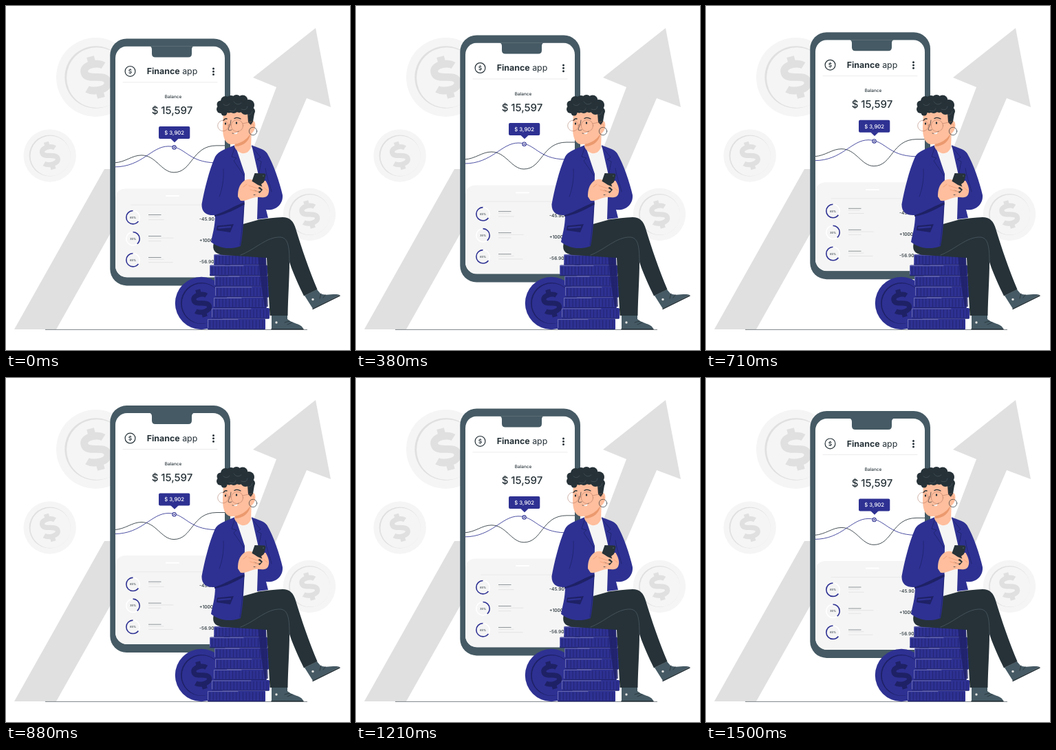
An HTML page for the animation above (1.54 s loop, 500 by 500 pixels).

```html
<!DOCTYPE html>
<html lang="en">
<head>
<meta charset="utf-8">
<title>Finance app</title>
<style>
  html, body { margin: 0; width: 100%; height: 100%; overflow: hidden; background: #fff; }
  svg { display: block; width: 100vw; height: 100vh; }
  text { font-family: Inter, sans-serif; font-weight: 500; fill: #263238; text-rendering: geometricPrecision; }
  .mid { text-anchor: middle; }
  .grey { --face: #f5f5f5; --mark: #e0e0e0; }
  .blue { --face: #2e3192; --mark: #1e2165; }
  .line { fill: none; stroke-linecap: round; stroke-linejoin: round; }
  .ink { stroke: #263238; }
  .shade { stroke: #1e2165; }
</style>
</head>
<body>
<svg viewBox="0 0 500 500">
  <defs>
    <path id="dollar" fill="none" d="M10 -9C5.500 -14 -9.500 -15 -9.500 -7C-9.500 2 10 -2 10 7C10 15 -6 14 -11 9M0 -20.500V-12M0 12V20.500"/>
    <g id="coin">
      <circle r="38.2" fill="var(--face)"/>
      <circle r="30" fill="var(--mark)"/>
      <circle cx="1" cy=".4" r="29.2" fill="var(--face)"/>
      <use href="#dollar" transform="rotate(-15)" stroke="var(--mark)" stroke-width="7.2"/>
    </g>
    <clipPath id="screen"><rect x="159" y="58" width="159" height="336" rx="17"/></clipPath>
  </defs>

  <g class="grey">
    <use href="#coin" transform="translate(130.5 103.5) scale(1.505)"/>
    <use href="#coin" transform="translate(63.7 217.5)"/>
    <use href="#coin" transform="translate(441 303)"/>
  </g>
  <path fill="#e0e0e0" d="M12 470L143 237H348L393 118L359 104L450 32L472 147L437 134L369 291H174L73 470Z"/>
  <path class="ink" stroke-width=".6" d="M57 470.4H438"/>

  <g id="phone">
    <rect x="151.3" y="47" width="174.7" height="359" rx="24" fill="#455a64"/>
    <g clip-path="url(#screen)">
      <path fill="#fff" d="M159 58H318V394H159Z"/>
      <path fill="#f5f5f5" d="M159 394V281Q159 265 175 265H302Q318 265 318 281V394Z"/>
      <path fill="#455a64" d="M207 57C211 58 212 60 212 63V69Q212 74 217 74H265Q270 74 270 69V63C270 60 271 58 275 57Z"/>
      <g class="line" stroke-width=".85">
        <path class="ink" d="M158 227.500C174 226.500 183 216.500 197 216.500C218 216.500 226 241.500 244 241.500C271 241.500 270 202.500 306 202.500H319"/>
        <path stroke="#2e3192" d="M158 233.500C198 233.500 211 203.500 236 203.500C261 203.500 264 227 305 227.500H319"/>
      </g>
      <circle cx="244.5" cy="205.2" r="2.7" fill="#fff" stroke="#2e3192" stroke-width="1.1"/>
      <circle cx="244.5" cy="205.2" r="1.1" fill="#2e3192"/>
      <path class="line" stroke="#e6e6e6" stroke-width=".8" d="M170 110.5H307M182 288.700H305"/>
      <path class="line" stroke="#fff" stroke-width="2" d="M233 275.700H251"/>
    </g>
    <circle cx="180.5" cy="94.5" r="7.4" class="line ink" stroke-width="1.2"/>
    <use href="#dollar" transform="translate(180.500 94.500) scale(.18)" class="ink" stroke-width="6"/>
    <path class="line ink" stroke-width="3" stroke-dasharray="0 4.300" d="M301.500 90.500V99.500"/>
    <text class="mid" x="241.5" y="98.800" font-size="12.400" style="font-weight:400"><tspan font-weight="700">Finance</tspan> app</text>
    <text class="mid" x="243" y="134" font-size="6.400">Balance</text>
    <text class="mid" x="241.5" y="157" font-size="15">$ 15,597</text>
    <rect x="222" y="174.500" width="45.300" height="18" rx="2" fill="#2e3192"/>
    <path fill="#2e3192" d="M239 192H251L245 197.800Z"/>
    <text class="mid" x="244.700" y="186.400" font-size="7.800" style="fill:#fff">$ 3,902</text>
    <g id="rows"></g>
  </g>

  <use href="#coin" class="blue" transform="translate(284 432)"/>
  <g id="stack"></g>
  <path fill="#1e2165" opacity=".75" d="M366 362H378L381 437H376Q370 405 366 362Z"/>

  <g id="shoes">
    <path fill="#455a64" d="M386 448H409V455C415 461 430 462 432 469H386Z"/>
    <path fill="#455a64" d="M434 421L452 412L457 418C465 422 478 417 485 420L446 440Z"/>
    <path class="line ink" stroke-width="1.5" d="M386 469.700H432M446 440.300L485 421"/>
    <path class="line ink" stroke-width=".8" d="M405 460L412 458M409 463L416 460M456 425L458 418M461 424L464 420"/>
    <circle cx="393" cy="460" r="1.700" fill="#e0e0e0"/><circle cx="446" cy="426.500" r="1.700" fill="#e0e0e0"/>
  </g>
  <path fill="#263238" d="M302 344C299 355 304 361 317 362L379 366C380 390 382 420 383.500 450H409.500C410 420 412 395 412 372C417 388 426 407 433 421.500L452.500 412C441 385 429 350 421.500 325C418 312 412 307 402 307C380 308 355 312 342 314Z"/>
  <path class="line" stroke="#65737a" stroke-width=".5" d="M341 362C362 354 379 335 399 336C409 337 412 347 412 372"/>

  <g id="torso">
    <path fill="#f5f5f5" d="M333 204L358 205L368 250L366 311L341 318Z"/>
    <path fill="#2e3192" d="M357 202C364 206 375 207 379.500 214C389 230 398 257 402 275C403 289 391 298 378 296L381 308L365 310L367 246Z"/>
    <path fill="#2e3192" d="M333 202C322 207 309 210 304 219C295 239 288 269 284.500 288C284 300 292 305 304 304C304 320 300 332 298 343C307 350 321 356 341 349C345 330 346 300 346.500 286L347 244Z"/>
    <path fill="#1e2165" d="M303 304C317 300 329 292 346.500 285V288.500C335 295 321 303 303 306Z"/>
    <path fill="#1e2165" d="M307 319.500L331 317L326 329L306 326Z"/>
    <path class="line" stroke="#2e3192" stroke-width="2.500" d="M309 322.500L326 321"/>
    <path class="line shade" stroke-width=".7" d="M333 204L328 219L335 221L331 225L346 247M357 204L370 220L365 223L371 226L367 247M316 237C317 252 314 267 310 277M377 236C379 250 384 260 386 270M346 288C344 308 343 330 340 348"/>
  </g>

  <g id="hands">
    <path fill="#ffbe9d" d="M337 277C337 267 339 260 345 255C351 250 358 251 363 256L377 254C381 259 384 268 381 274C377 281 369 277 363 278C355 279 349 284 341 283Z"/>
    <path fill="#263238" d="M361.500 243L375.500 243.500Q378 244 377.300 247L373 263L357 256Z"/>
    <path fill="#ffbe9d" d="M346 254C353 251 361 256 368 262L364 266L352 260ZM371 259L377.500 254L381 264L375 270Z"/>
    <path fill="#263238" d="M359 268L369 263L373 267L367 274L360 275Z"/>
    <path fill="#ffbe9d" d="M352 262C360 260 367 264 371 268L367 270C362 267 359 267 356 268ZM356 268C362 267 368 270 370 274L365 275L356 273Z"/>
    <path class="line" stroke="#eb996e" stroke-width=".7" d="M353 261L365 265M355 267L365 270M375 264L380 268M345 263L350 259"/>
    <circle cx="374" cy="247" r="1" fill="#455a64"/>
  </g>

  <g id="head">
    <path fill="#ffbe9d" d="M333 192L357 178L356 205C354 212 348 215 343 214C337 212 333 208 332 204Z"/>
    <path fill="#eb996e" d="M333 200C342 199 350 194 355 186C354 196 345 204 333 204Z"/>
    <path fill="#ffbe9d" d="M316 151L315 177C315 190 318 199 326 201C338 202 349 195 354 186C363 185 365 168 359 167L354 169L351 147Z"/>
    <g id="hair" fill="#263238"></g>
    <path fill="#263238" d="M351 156H361L359 168L356 173L352 169Z"/>
    <path class="line" stroke="#65737a" stroke-width=".4" d="M316 143Q321 147 325 142M331 139Q336 146 342 141M325 152Q332 155 334 149M342 150Q350 153 351 146M351 158Q356 160 358 153"/>
    <g class="line ink">
      <path d="M316 166.500Q318 163 321 164M332 163.500Q336 161 341 164" stroke-width="1.400"/>
      <path d="M327 166C327 172 323 177 323 180Q325 182 328 180M329 185Q334 187 338 182" stroke-width=".7"/>
      <circle cx="359" cy="182" r="5.700" stroke-width=".7"/>
    </g>
    <path fill="#fff" d="M330 185Q334 185 337 183Q336 188 330 185Z"/>
    <g fill="#263238"><ellipse cx="319" cy="171" rx="1.200" ry="1.700"/><ellipse cx="335" cy="170" rx="1.200" ry="1.700"/></g>
    <g class="line" stroke="#a66e5b" stroke-width=".5">
      <circle cx="315.500" cy="174" r="7.800"/><circle cx="336" cy="174" r="8.600"/>
      <path d="M323 173Q325 171 327.500 173M344 171L357 168"/>
    </g>
    <path class="line" stroke="#eb996e" stroke-width=".8" d="M356 172Q361 169 360 177"/>
  </g>
</svg>
<script>
  const byId = id => document.getElementById(id);

  // Transaction list: a progress ring, text rules and an amount
  const rows = [['65%', '-45.90', -65], ['35%', '+1000', 39], ['65%', '-56.90', -65]];
  byId('rows').innerHTML = rows.map(([label, amount, share], i) => {
    const flip = share < 0 ? 'scale(-1 1)' : '';
    return `<g transform="translate(184.5 ${306.8 + 31 * i})">
      <circle r="9.7" fill="none" stroke="#fff" stroke-width="1.6"/>
      <circle r="9.7" fill="none" stroke="#2e3192" stroke-width="1.6" pathLength="100"
        stroke-dasharray="${Math.abs(share)} 100" transform="${flip} rotate(-90)"/>
      <text class="mid" y="1.5" font-size="4.2" style="font-weight:400">${label}</text>
      <path class="ink" stroke-width=".5" d="M22.500 -3.700H41"/>
      <path stroke="#d2d2d2" stroke-width=".5" d="M22.500 3.500H${[45, 41, 58][i]}M22.500 -1H${[39, 59, 45][i]}"/>
      <text x="96.5" y="4.500" font-size="6.700">${amount}</text></g>`;
  }).join('');

  // Stacked coins with ribbed edges
  const coins = [[302, 378], [296, 380], [303, 382], [304, 382], [302, 379], [299, 383], [293, 377]];
  byId('stack').innerHTML = coins.map(([left, right], i) => {
    const y = 361 + 15.6 * i;
    return `<rect x="${left}" y="${y}" width="${right - left}" height="15.6" rx="1.5" fill="#2e3192"/>
      <path class="shade" stroke-width="12" stroke-dasharray=".7 4.1" d="M${left + 3} ${y + 8}H${right - 2}"/>
      <path class="line shade" stroke-width="1" d="M${left + 1} ${y + 15}H${right - 1}"/>
      <path class="line" stroke="#c5c6e6" stroke-width=".4" d="M${left + .5} ${y + 13}V${y + 1}H${left + 32 + i * 17 % 30}"/>`;
  }).join('');

  const curls = [[312, 150, 6], [312, 143, 5.5], [319, 138, 7], [327, 137, 7], [335, 136, 7], [344, 137, 7.5], [353, 144, 8],
    [356, 153, 6], [324, 147, 8.5], [339, 146, 9], [317, 155, 4.5], [331, 150, 6], [348, 151, 7]];
  byId('hair').innerHTML = curls.map(([x, y, r]) => `<circle cx="${x}" cy="${y}" r="${r}"/>`).join('');

  // The phone floats up and down linearly, drawn at 24 steps a second
  const LOOP = 1540, FPS = 24, LIFT = 10, LOWEST = 1490;
  const start = performance.now();
  function draw() {
    const now = performance.now() - start;
    const t = Math.floor((now % LOOP + 4) * FPS / 1000) * 1000 / FPS;
    const phase = ((t - LOWEST + LOOP) % LOOP) / LOOP;
    const rise = LIFT * (1 - Math.abs(2 * phase - 1));
    byId('phone').setAttribute('transform', `translate(0 ${(1.05 - rise).toFixed(2)})`);
    requestAnimationFrame(draw);
  }
  draw();
</script>
</body>
</html>
```
